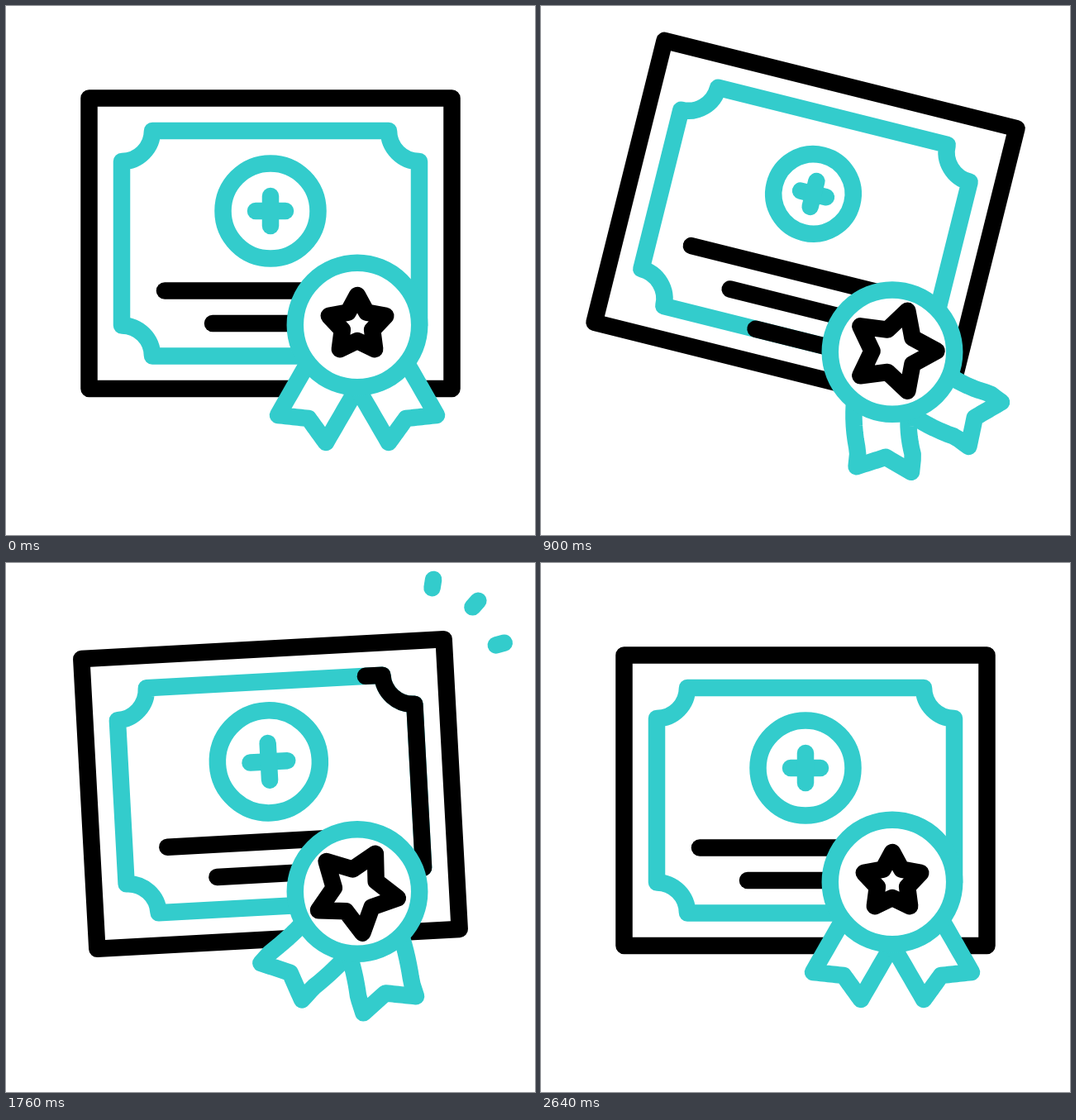
Animation, 640 px wide and 640 px high, one loop 3 s. Source, as an HTML page with a canvas:

```html
<!DOCTYPE html>
<html lang="en">
<head>
<meta charset="utf-8">
<title>Certificate</title>
<style>
  html, body { margin: 0; width: 100%; height: 100%; overflow: hidden; background: #fff; }
  canvas { display: block; width: 100vmin; height: 100vmin; }
</style>
</head>
<body>
<canvas id="stage"></canvas>
<script>
const SIZE = 640, LOOP = 3000, BEGIN = 200, END = 2640;
const TEAL = '#33cccc', BLACK = '#000', WHITE = '#fff';
const canvas = document.getElementById('stage');
const ctx = canvas.getContext('2d');

const rad = deg => deg * Math.PI / 180;
const clamp = (v, lo, hi) => Math.min(hi, Math.max(lo, v));
const mix = (a, b, u) => a + (b - a) * u;

// Eased progress from 0 to 1 between two times
function ease(t, from, to) {
  const u = clamp((t - from) / (to - from), 0, 1);
  return u * u * (3 - 2 * u);
}

// Eased walk through poses, one per time
const walk = (t, times, poses) => poses.slice(1).reduce(
  (v, pose, i) => v + (pose - poses[i]) * ease(t, times[i], times[i + 1]), poses[0]);

// The bounce keeps an even beat, the swaying follows a little later
const BEAT = [BEGIN, 800, 1400, 2000, END];
const SWAY = [BEGIN, 900, 1600, 2100, END];
const lift = t => walk(t, BEAT, [0, 1, -1, 1, 0]);
const sway = (t, right, left, back) => rad(walk(t, SWAY, [0, right, left, back, 0]));
const pulse = (t, rest, low, high) => walk(t, BEAT, [rest, low, high, rest]);

function stroke(color, path) {
  ctx.strokeStyle = color;
  if (path) ctx.stroke(path); else ctx.stroke();
}

function line(color, x0, y0, x1, y1) {
  ctx.beginPath();
  ctx.moveTo(x0, y0);
  ctx.lineTo(x1, y1);
  stroke(color);
}

function circle(color, r) {
  ctx.beginPath();
  ctx.arc(0, 0, r, 0, 2 * Math.PI);
  ctx.fillStyle = WHITE;
  ctx.fill();
  stroke(color);
}

// Card parts are placed around the card's middle
const CARD = { w: 219.5, h: 175.7 }, INNER = { w: 180, h: 136.2, notch: 37 };

// Notched border, clockwise from the lower right corner
const border = new Path2D();
for (let i = 0; i < 4; i++) {
  const x = i % 3 ? -INNER.w : INNER.w, y = i < 2 ? INNER.h : -INNER.h;
  border.arc(x, y, INNER.notch, rad(90 * i - 90), rad(90 * i - 180), true);
}
border.closePath();
const BORDER_LEN = 4 * (INNER.w + INNER.h) + (2 * Math.PI - 8) * INNER.notch;

// A black stretch runs along the border, both ends out of sight behind the badge
function drawTrail(t) {
  const head = mix(-199, 1941, ease(t, BEGIN, END));
  const from = clamp(head - 384, 0, BORDER_LEN), to = clamp(head, 0, BORDER_LEN);
  if (to - from < 0.5) return;
  ctx.setLineDash([to - from, 2 * BORDER_LEN]);
  ctx.lineDashOffset = -from;
  stroke(BLACK, border);
  ctx.setLineDash([]);
}

// Three rays fan out beyond the upper right corner
function drawRays(t) {
  const near = mix(75.6, 105.6, ease(t, 1640, 1840));
  const far = mix(75.6, 105.6, ease(t, 1400, 1600));
  if (far - near < 0.1) return;
  const x = CARD.w - 30.5, y = 30.5 - CARD.h;
  for (let i = -1; i <= 1; i++) {
    const a = rad(33 * i - 45), c = Math.cos(a), s = Math.sin(a);
    line(TEAL, x + near * c, y + near * s, x + far * c, y + far * s);
  }
}

function drawSeal(t) {
  const arm = pulse(t, 18, 14.7, 30.6);
  ctx.save();
  ctx.translate(0, -39.2);
  circle(TEAL, pulse(t, 57.5, 46.4, 70.4));
  line(TEAL, -arm, 0, arm, 0);
  line(TEAL, 0, -arm, 0, arm);
  ctx.restore();
}

function drawCard(t) {
  ctx.save();
  ctx.translate(320, 287.2 - 25.6 * lift(t));
  ctx.rotate(sway(t, 14, -8, 12));
  ctx.beginPath();
  ctx.rect(-CARD.w, -CARD.h, 2 * CARD.w, 2 * CARD.h);
  stroke(BLACK);
  stroke(TEAL, border);
  drawTrail(t);
  drawSeal(t);
  line(BLACK, -128, 57.3, 128, 57.3);
  line(BLACK, -70, 96.8, 70, 96.8);
  drawRays(t);
  ctx.restore();
}

// One ribbon tail; it bends, so the turn grows with the distance from the badge
const RIBBON = [[-50, 29], [-96, 109], [-59, 113], [-38, 142], [6, 66]];

function drawRibbon(side, turn) {
  const steps = 12;
  ctx.beginPath();
  for (let i = 1; i < RIBBON.length; i++) {
    const [x0, y0] = RIBBON[i - 1], [x1, y1] = RIBBON[i];
    for (let j = 0; j <= steps; j++) {
      const x = side * mix(x0, x1, j / steps), y = mix(y0, y1, j / steps);
      const r = Math.hypot(x, y);
      const a = Math.atan2(y, x) + turn * Math.min(1, 0.08 + 0.0072 * r);
      ctx.lineTo(r * Math.cos(a), r * Math.sin(a));
    }
  }
  ctx.fillStyle = WHITE;
  ctx.fill();
  stroke(TEAL);
}

// The star swings about a point slightly above its middle
function drawStar(radius, turn) {
  const drop = 3.2;
  ctx.save();
  ctx.translate(0, -drop);
  ctx.rotate(turn);
  ctx.beginPath();
  for (let i = 0; i < 10; i++) {
    const r = i % 2 ? radius * 0.53 : radius, a = rad(i * 36 - 90);
    ctx.lineTo(r * Math.cos(a), drop + r * Math.sin(a));
  }
  ctx.closePath();
  stroke(BLACK);
  ctx.restore();
}

function drawBadge(t) {
  const swing = sway(t, -54, 48, -37);
  const grown = ease(t, BEGIN, 800) - ease(t, 2000, END);
  ctx.save();
  ctx.translate(425, 386 + 38.4 * lift(t));
  drawRibbon(1, swing * 0.444);
  drawRibbon(-1, swing * 0.444);
  circle(TEAL, 75.2);
  drawStar(mix(36, 51, grown), swing);
  ctx.restore();
}

function resize() {
  const box = Math.min(innerWidth, innerHeight) || SIZE;
  canvas.width = canvas.height = Math.round(box * (devicePixelRatio || 1));
}

function draw(t) {
  const k = canvas.width / SIZE;
  ctx.setTransform(k, 0, 0, k, 0, 0);
  ctx.fillStyle = WHITE;
  ctx.fillRect(0, 0, SIZE, SIZE);
  ctx.lineWidth = 20.5;
  ctx.lineCap = ctx.lineJoin = 'round';
  drawCard(t);
  drawBadge(t);
}

const start = performance.now();
function tick() {
  draw((performance.now() - start) % LOOP);
  requestAnimationFrame(tick);
}
addEventListener('resize', resize);
resize();
tick();
</script>
</body>
</html>
```
